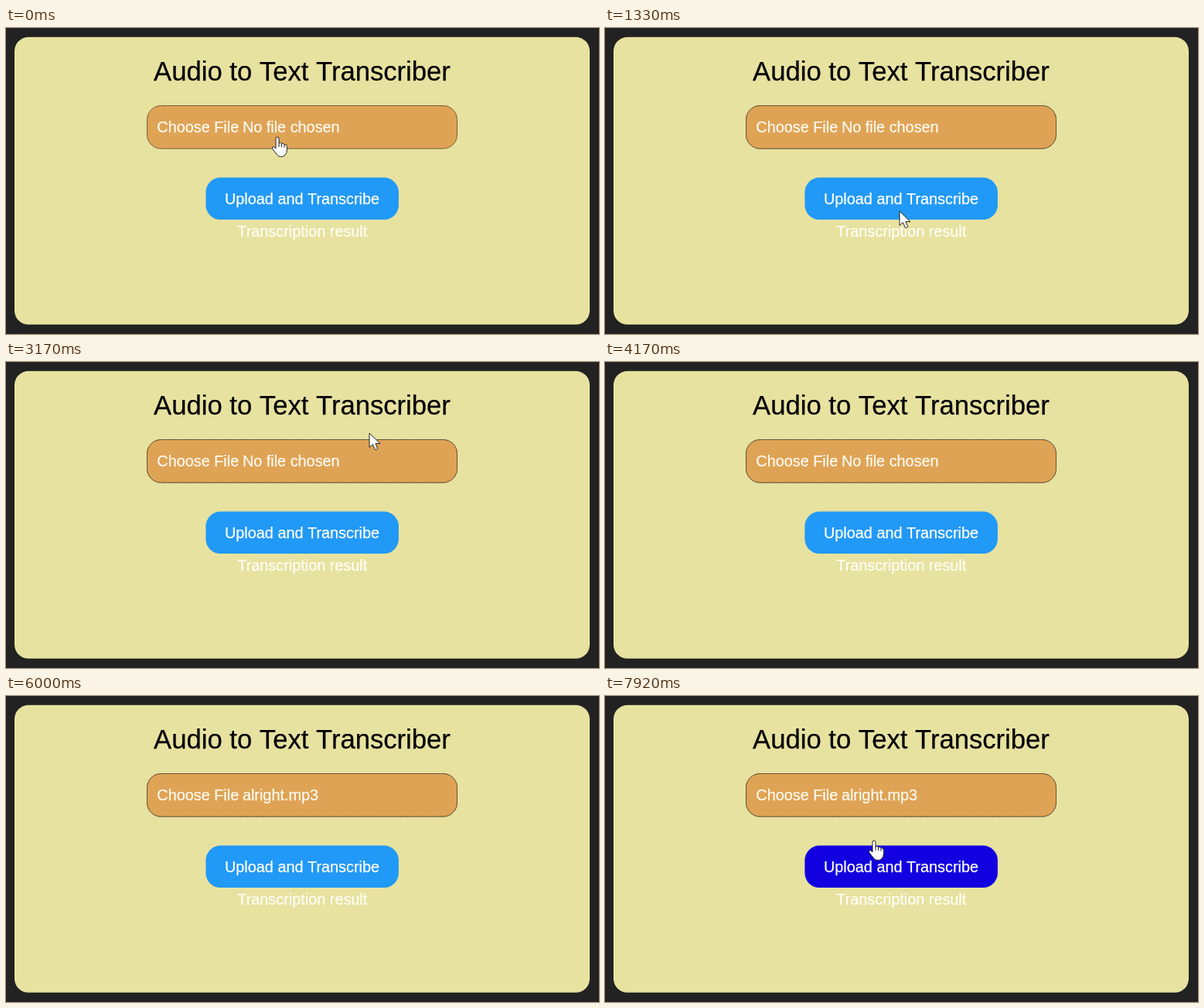
Recreate the animation shown at these times as an HTML page with a canvas. Size 767x396 px, loop 8 s.

```html
<!DOCTYPE html>
<html lang="en">
<head>
<meta charset="utf-8">
<title>Audio to Text Transcriber</title>
<style>
  html, body { margin: 0; width: 100%; height: 100%; overflow: hidden; background: #222; }
  canvas { display: block; }
</style>
</head>
<body>
<canvas id="stage" width="767" height="396"></canvas>
<script>
const ctx = document.getElementById('stage').getContext('2d');
const LOOP = 8000, STEP = 1000 / 12;
const FILE_CHOSEN = 6000, FOCUSED = 500, HOVERED = 7750;

const ARROW = new Path2D('M0 0V18.5L4.4 14.6L7.4 21.4Q8.8 22.3 10.7 20.1L7.9 13.6H14Z');
const HAND = new Path2D(
  'M-2 2Q-2 0 0 0Q2 0 2 2V8Q4.6 6.8 5.5 8.6Q8 7.8 9 9.8Q12.4 9.2 12.4 12.2V17' +
  'Q12.4 21 10 23.4Q8 25.6 4.6 25.6Q1.4 25.6 -0.6 22.8L-4.4 18Q-7.2 14.8 -6.4 13.2Q-5 11.6 -2 15Z');
const FINGERS = new Path2D('M2 8V13M5.5 8.6V13.2M9 9.8V13.8');

// Pointer runs: [ms, x, y, shape]; the shape holds until the next key.
const RUNS = [
  [[0, 351, 141, 'hand'], [600, 352, 142, 'hand'], [1000, 372, 184, 'arrow'],
   [1330, 381, 237, 'arrow'], [1580, 382, 228, 'arrow'], [1920, 379, 150, 'hand'],
   [2165, 378, 112, 'hand'], [2580, 386, 115, 'hand'], [2920, 436, 106, 'arrow'],
   [3165, 470, 92, 'arrow'], [3600, 560, 62, 'arrow'], [4000, 766, 14, 'arrow']],
  [[7080, 766, 250, 'arrow'], [7420, 560, 235, 'arrow'], [7700, 400, 202, 'arrow'],
   [7750, 374, 195, 'hand'], [7915, 348, 187, 'hand'], [8000, 346, 187, 'hand']]
];

function pointerAt(t) {
  const run = RUNS.find(r => t >= r[0][0] && t < r[r.length - 1][0]);
  if (!run) return null;
  const i = run.findIndex(k => k[0] > t) - 1;
  const [t0, x0, y0, shape] = run[i], [t1, x1, y1] = run[i + 1];
  const p = (t - t0) / (t1 - t0), e = p * p * (3 - 2 * p);
  return { x: x0 + (x1 - x0) * e, y: y0 + (y1 - y0) * e, shape };
}

function box(x, y, w, h, r, fill) {
  ctx.beginPath();
  ctx.roundRect(x, y, w, h, r);
  ctx.fillStyle = fill;
  ctx.fill();
}

function label(text, x, y, size, color, align) {
  ctx.font = `${size}px "Liberation Sans", Arial, sans-serif`;
  ctx.textAlign = align;
  ctx.fillStyle = ctx.strokeStyle = color;
  ctx.fillText(text, x, y);
  // A hairline gives the slightly heavier stems of screen text.
  ctx.lineWidth = 0.25;
  ctx.strokeText(text, x, y);
}

function drawField(t) {
  box(182.5, 100.5, 401, 55.6, 18, '#dfa355');
  ctx.lineWidth = 1;
  ctx.strokeStyle = '#76603c';
  ctx.stroke();
  if (t >= FOCUSED) {
    ctx.setLineDash([2, 1]);
    ctx.strokeStyle = 'rgba(70, 60, 50, 0.5)';
    ctx.stroke();
    ctx.setLineDash([]);
  }
  label('Choose File', 195.3, 135, 19.85, '#fffaf0', 'left');
  label(t < FILE_CHOSEN ? 'No file chosen' : 'alright.mp3', 305.9, 135, 19.85, '#fffaf0', 'left');
}

function drawPointer({ x, y, shape }) {
  ctx.save();
  ctx.translate(x, y);
  ctx.fillStyle = '#fff';
  ctx.strokeStyle = '#222';
  ctx.lineWidth = 1;
  ctx.lineJoin = 'round';
  const path = shape === 'hand' ? HAND : ARROW;
  ctx.fill(path);
  ctx.stroke(path);
  if (shape === 'hand') ctx.stroke(FINGERS);
  ctx.restore();
}

function draw(t) {
  ctx.fillStyle = '#222';
  ctx.fillRect(0, 0, 767, 396);
  box(11, 11.8, 744, 372, 18, '#e7e2a0');
  label('Audio to Text Transcriber', 383, 68, 34.65, '#000', 'center');
  drawField(t);

  box(258.4, 193.6, 249.5, 54.5, 19, t < HOVERED ? '#2199f6' : '#1200e0');
  label('Upload and Transcribe', 383, 227.5, 19.85, '#fff', 'center');
  label('Transcription result', 383.3, 269.5, 19.85, '#fffef6', 'center');

  const pointer = pointerAt(t);
  if (pointer) drawPointer(pointer);
}

function tick() {
  const t = performance.now() % LOOP;
  draw(Math.floor((t + 5) / STEP) * STEP);
  requestAnimationFrame(tick);
}
tick();
</script>
</body>
</html>
```
